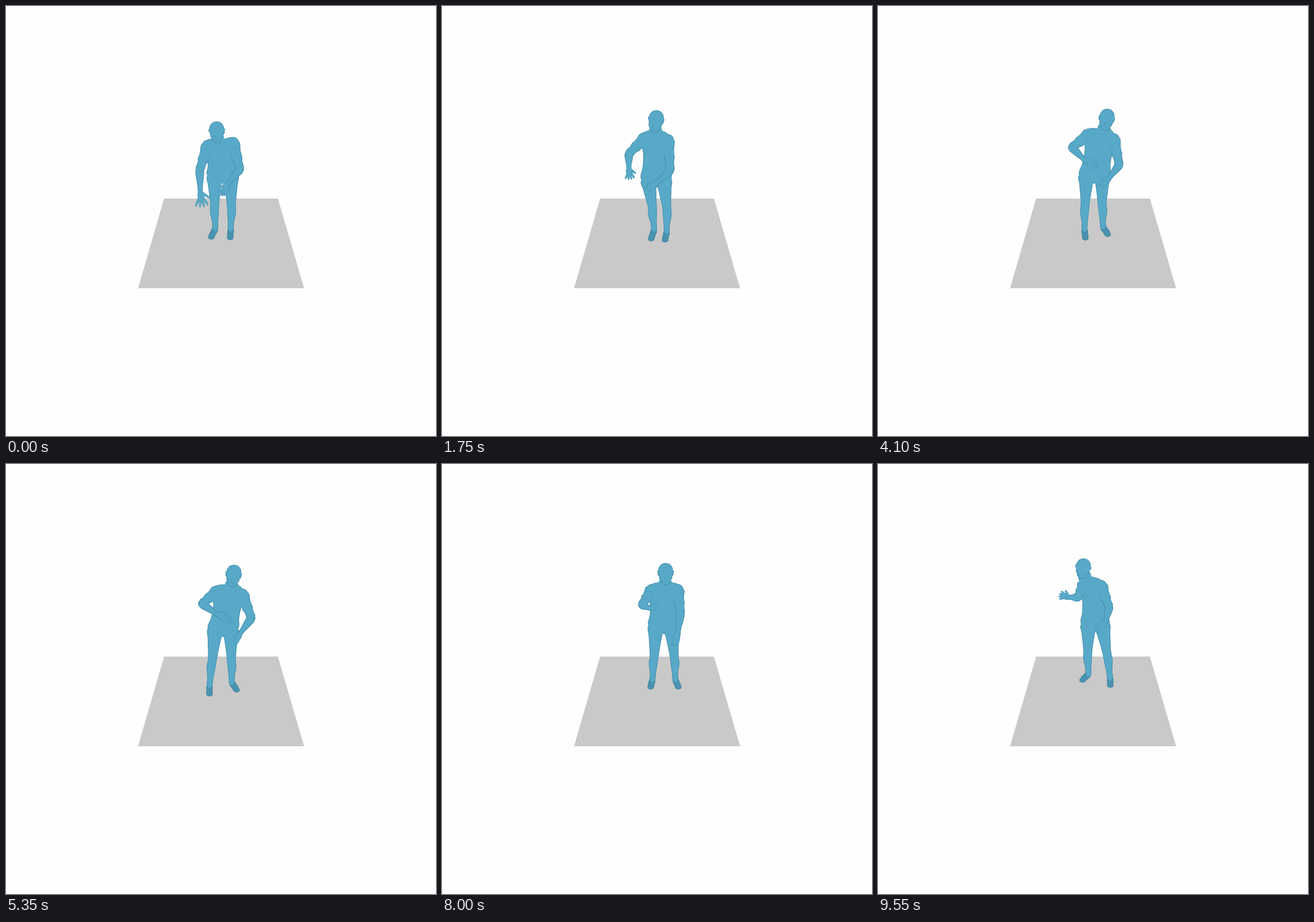
Write an HTML page with a canvas that moves like this. It is 748 px wide and 748 px high and loops after 9600 ms.

```html
<!DOCTYPE html>
<html lang="en">
<head>
<meta charset="utf-8">
<title>Figure on a floor</title>
<style>
  html, body { margin: 0; width: 100%; height: 100%; overflow: hidden; background: #fefefe; }
  canvas { display: block; width: 748px; height: 748px; }
</style>
</head>
<body>
<canvas id="stage" width="748" height="748"></canvas>
<script>
const ctx = document.getElementById('stage').getContext('2d');
const LOOP = 9600, STEP = 50;
const BODY = [[0, '#468eab'], [0.7, '#519fbd'], [1.5, '#58a9c8']];
const FOOT = [[0, '#3f829b'], [0.8, '#4992b0']];

// Each joint has its own track; pairs hold the left point, then the right one.
const tracks = {};
function pose(time, joints) {
  for (const [name, values] of Object.entries(joints)) {
    (tracks[name] ||= []).push({ time, values });
  }
}

pose(0, {
  head: [366.5, 213.5], chin: [367, 230], look: [0.8, 1],
  shoulder: [351, 243, 395, 238], elbow: [337, 285, 407, 284],
  wrist: [338, 322, 388, 307], tip: [341, 349, 375, 329],
  hip: [363, 295, 391, 295], knee: [363, 346, 392, 346],
  ankle: [364, 388, 391, 389], toe: [357, 401, 390, 402]
});
pose(1000, { elbow: [330, 271, 411, 282], wrist: [331, 304, 390, 305] });
pose(1750, {
  head: [373, 194], chin: [370, 212], look: [0.8, 1],
  shoulder: [354, 229, 393, 233], elbow: [325, 257, 397, 286],
  wrist: [325, 282, 377, 305], tip: [327, 301, 356, 319],
  hip: [359, 302, 386, 302], knee: [366, 350, 391, 351],
  ankle: [369, 390, 391, 393], toe: [364, 404, 388, 406]
});
pose(2900, {
  head: [399.5, 194], chin: [396, 211], look: [0, 0.35],
  shoulder: [366, 226, 407, 234], elbow: [328, 244, 410, 283],
  wrist: [348, 273, 397, 299], tip: [363, 287, 374, 317],
  hip: [361, 301, 389, 301], knee: [363, 348, 389, 347],
  ankle: [366, 391, 391, 389], toe: [367, 404, 398, 401]
});
pose(4000, { elbow: [337, 246, 419, 277], wrist: [358, 268, 403, 298] });
pose(5350, {
  head: [396.5, 188], chin: [394, 205], look: [0, 0.2],
  shoulder: [368, 221, 411, 227], elbow: [341, 243, 427, 268],
  wrist: [368, 262, 407, 295], tip: [391, 273, 398, 312],
  hip: [364, 287, 391, 287], knee: [359, 340, 392, 340],
  ankle: [354, 386, 393, 381], toe: [354, 399, 401, 392]
});
pose(6950, {
  head: [386.5, 186], chin: [386, 203], look: [0, -0.3],
  shoulder: [361, 220, 405, 221], elbow: [338, 247, 410, 262],
  wrist: [360, 253, 407, 295], tip: [382, 249, 404, 322],
  hip: [368, 284, 395, 284], knee: [365, 338, 401, 337],
  ankle: [364, 380, 403, 376], toe: [361, 392, 410, 388]
});
pose(7400, { elbow: [331, 247, 411, 261], wrist: [351, 252, 408, 294] });
pose(8000, {
  head: [389, 185], chin: [389, 202], look: [0, -0.4],
  shoulder: [365, 219, 410, 219], elbow: [348, 245, 415, 260],
  wrist: [361, 251, 411, 291], tip: [375, 245, 405, 316],
  hip: [372, 282, 399, 282], knee: [369, 335, 404, 335],
  ankle: [366, 376, 406, 376], toe: [363, 387, 411, 387]
});
pose(8500, { elbow: [344, 241, 420, 258] });
pose(9000, {
  head: [367, 177], chin: [363, 194], look: [1.1, -0.8],
  wrist: [339, 240, 404, 281], tip: [334, 234, 391, 300]
});
pose(9550, {
  head: [357.5, 177], chin: [355, 191], look: [1.9, -1],
  shoulder: [358, 210, 388, 212], elbow: [348, 232, 402, 249],
  wrist: [333, 232, 396, 275], tip: [316, 228, 380, 291],
  hip: [366, 279, 390, 279], knee: [365, 326, 398, 328],
  ankle: [366, 366, 404, 373], toe: [356, 375, 404, 384]
});

const lerp = (p, q, k) => ({ x: p.x + (q.x - p.x) * k, y: p.y + (q.y - p.y) * k });
const shift = (p, x, y) => ({ x: p.x + x, y: p.y + y });

// Slope at a key, flat where the motion turns, so that it never overshoots.
function slope(keys, i, n) {
  const a = keys[i - 1], b = keys[i], c = keys[i + 1];
  if (!a || !c) return 0;
  const before = (b.values[n] - a.values[n]) / (b.time - a.time);
  const after = (c.values[n] - b.values[n]) / (c.time - b.time);
  return before * after <= 0 ? 0 : 2 * before * after / (before + after);
}

function sample(name, time) {
  const keys = tracks[name];
  let i = 0;
  while (i < keys.length - 2 && time > keys[i + 1].time) i++;
  const a = keys[i], b = keys[i + 1], span = b.time - a.time;
  const u = Math.min(1, (time - a.time) / span), v = 1 - u;
  return a.values.map((from, n) =>
    from * v * v * (1 + 2 * u) + b.values[n] * u * u * (3 - 2 * u) +
    span * u * v * (slope(keys, i, n) * v - slope(keys, i + 1, n) * u));
}

function disc(p, r) {
  ctx.beginPath();
  ctx.arc(p.x, p.y, r, 0, Math.PI * 2);
  ctx.fill();
}

// Closed smooth curve through the points.
function blob(points) {
  const n = points.length, at = i => points[(i + n) % n];
  ctx.beginPath();
  ctx.moveTo(points[0].x, points[0].y);
  points.forEach((p, i) => {
    const a = at(i - 1), q = at(i + 1), b = at(i + 2);
    ctx.bezierCurveTo(p.x + (q.x - a.x) / 6, p.y + (q.y - a.y) / 6,
      q.x - (b.x - p.x) / 6, q.y - (b.y - p.y) / 6, q.x, q.y);
  });
  ctx.fill();
}

// Rounded limb along a spine of [point, radius] pairs.
function tube(spine, inset) {
  const side = dir => spine.map(([p, r], i) => {
    const a = spine[Math.max(0, i - 1)][0];
    const b = spine[Math.min(spine.length - 1, i + 1)][0];
    const k = dir * (r - inset) / (Math.hypot(b.x - a.x, b.y - a.y) || 1);
    return shift(p, (a.y - b.y) * k, (b.x - a.x) * k);
  });
  blob([...side(1), ...side(-1).reverse()]);
  for (const [p, r] of [spine[0], spine[spine.length - 1]]) disc(p, r - inset);
}

// Paints a group from its dark rim inwards.
function shaded(layers, paint) {
  for (const [inset, colour] of layers) {
    ctx.fillStyle = colour;
    paint(inset);
  }
}

const neckBase = j => lerp(lerp(j.shoulder[0], j.shoulder[1], 0.5), j.chin, 0.55);

function trunk(j, inset) {
  const neck = neckBase(j);
  const side = (i, dir) => {
    const s = j.shoulder[i], h = j.hip[i];
    const edge = (k, out) => shift(lerp(s, h, k), dir * (out - inset), 0);
    return [
      shift(neck, dir * 9, inset - 4), shift(s, dir * 1, inset - 9.3),
      edge(0.12, 7), edge(0.42, 6), edge(0.7, 8.5), edge(1, 12.3)
    ];
  };
  const crotch = shift(lerp(j.hip[0], j.hip[1], 0.5), 0, 14);
  blob([...side(0, -1), crotch, ...side(1, 1).reverse()]);
}

function leg(j, i, inset) {
  const hip = j.hip[i], knee = j.knee[i], ankle = j.ankle[i];
  const out = i ? 0.8 : -0.8;
  tube([
    [hip, 12.4], [lerp(hip, knee, 0.35), 11.4], [lerp(hip, knee, 0.7), 9.2],
    [knee, 7.7], [shift(lerp(knee, ankle, 0.32), out, 0), 7.6],
    [lerp(knee, ankle, 0.7), 5.4], [ankle, 4.4]
  ], inset);
}

function foot(j, i, inset) {
  const ankle = j.ankle[i], toe = j.toe[i];
  tube([[ankle, 4.8], [lerp(ankle, toe, 0.5), 5.4], [toe, 4.6]], inset);
  tube([[shift(toe, -2, 1), 3.6], [shift(toe, 2, 1), 3.6]], inset);
}

function hand(wrist, tip, open, thumbSide, inset) {
  const dx = tip.x - wrist.x, dy = tip.y - wrist.y;
  const at = (along, across) =>
    shift(wrist, dx * along + dy * across, dy * along - dx * across);
  const fan = 0.1 + 0.15 * open;
  tube([[wrist, 3.8], [at(0.45, 0), 4.8]], inset);
  for (let k = -1.5; k <= 1.5; k++) {
    tube([[at(0.45, k * 0.1), 1.8], [at(1 - k * k * 0.045, k * fan), 1.3]], inset * 0.4);
  }
  tube([[at(0.15, thumbSide * 0.12), 2.2],
    [at(0.5, thumbSide * (0.26 + 0.28 * open)), 1.3]], inset * 0.4);
}

function upperArm(j, i, inset) {
  const shoulder = j.shoulder[i], elbow = j.elbow[i];
  tube([[shoulder, 10.3], [lerp(shoulder, elbow, 0.35), 9.2],
    [lerp(shoulder, elbow, 0.75), 7.4], [elbow, 6.6]], inset);
}

function lowerArm(j, i, inset) {
  const shoulder = j.shoulder[i], elbow = j.elbow[i], wrist = j.wrist[i];
  // The inner layers reach further up, so no seam shows across the upper arm.
  const start = lerp(shoulder, elbow, inset ? 0.35 : 0.5);
  tube([[start, inset ? 9.2 : 8.5], [lerp(shoulder, elbow, 0.75), 7.4], [elbow, 6.6]], inset);
  tube([[elbow, 6.6], [lerp(elbow, wrist, 0.35), 6.7],
    [lerp(elbow, wrist, 0.75), 4.7], [wrist, 3.8]], inset);
  const thumb = j.look[1];
  hand(wrist, j.tip[i], i ? 0.1 : Math.abs(thumb), i ? -1 : Math.sign(thumb) || 1, inset);
}

function head(j) {
  const { head: top, chin } = j, turn = j.look[0];
  const tilt = Math.atan2(top.x - chin.x, chin.y - top.y);
  const neck = neckBase(j);
  ctx.fillStyle = '#58a9c8';
  tube([[chin, 9], [neck, 10]], 0);
  ctx.save();
  ctx.translate(top.x, top.y);
  ctx.rotate(tilt);
  ctx.fillStyle = '#4c98b5';
  const ears = [-12.2 + 6 * turn, 12.2 - 6 * Math.max(0, turn - 1)];
  for (const x of ears) {
    ctx.beginPath();
    ctx.ellipse(x, 6, 1.6, 3.6, 0, 0, Math.PI * 2);
    ctx.fill();
  }
  ctx.restore();
  shaded(BODY, inset =>
    tube([[top, 12.8], [lerp(top, chin, 0.5), 11.8], [chin, 9]], inset));
  ctx.save();
  ctx.translate(chin.x - turn * 3, chin.y);
  ctx.rotate(tilt);
  ctx.strokeStyle = 'rgba(50, 118, 146, 0.4)';
  ctx.lineWidth = 1;
  ctx.beginPath();
  ctx.moveTo(-1.5, -5);
  ctx.lineTo(-2, 1);
  ctx.moveTo(1.5, 1);
  ctx.lineTo(2, 4);
  ctx.stroke();
  ctx.restore();
}

function readJoints(time) {
  const joints = {};
  for (const name of Object.keys(tracks)) {
    const [x, y, x2, y2] = sample(name, time);
    if (name === 'look') joints.look = [x, y];
    else joints[name] = x2 === undefined ? { x, y } : [{ x, y }, { x: x2, y: y2 }];
  }
  return joints;
}

function floor() {
  ctx.fillStyle = '#c9c9c9';
  ctx.beginPath();
  ctx.moveTo(275, 335);
  ctx.lineTo(473, 335);
  ctx.lineTo(518.5, 491);
  ctx.lineTo(229.7, 491);
  ctx.fill();
}

function draw(time) {
  ctx.fillStyle = '#fefefe';
  ctx.fillRect(0, 0, 748, 748);
  floor();
  const j = readJoints(time);
  for (const i of [0, 1]) shaded(FOOT, inset => foot(j, i, inset));
  shaded(BODY, inset => {
    for (const i of [0, 1]) {
      leg(j, i, inset);
      upperArm(j, i, inset);
    }
    trunk(j, inset);
  });
  for (const i of [1, 0]) shaded(BODY, inset => lowerArm(j, i, inset));
  head(j);
}

const start = performance.now();
function tick() {
  const elapsed = (performance.now() - start) % LOOP;
  draw(Math.floor(elapsed / STEP) * STEP);
  requestAnimationFrame(tick);
}
tick();
</script>
</body>
</html>
```
